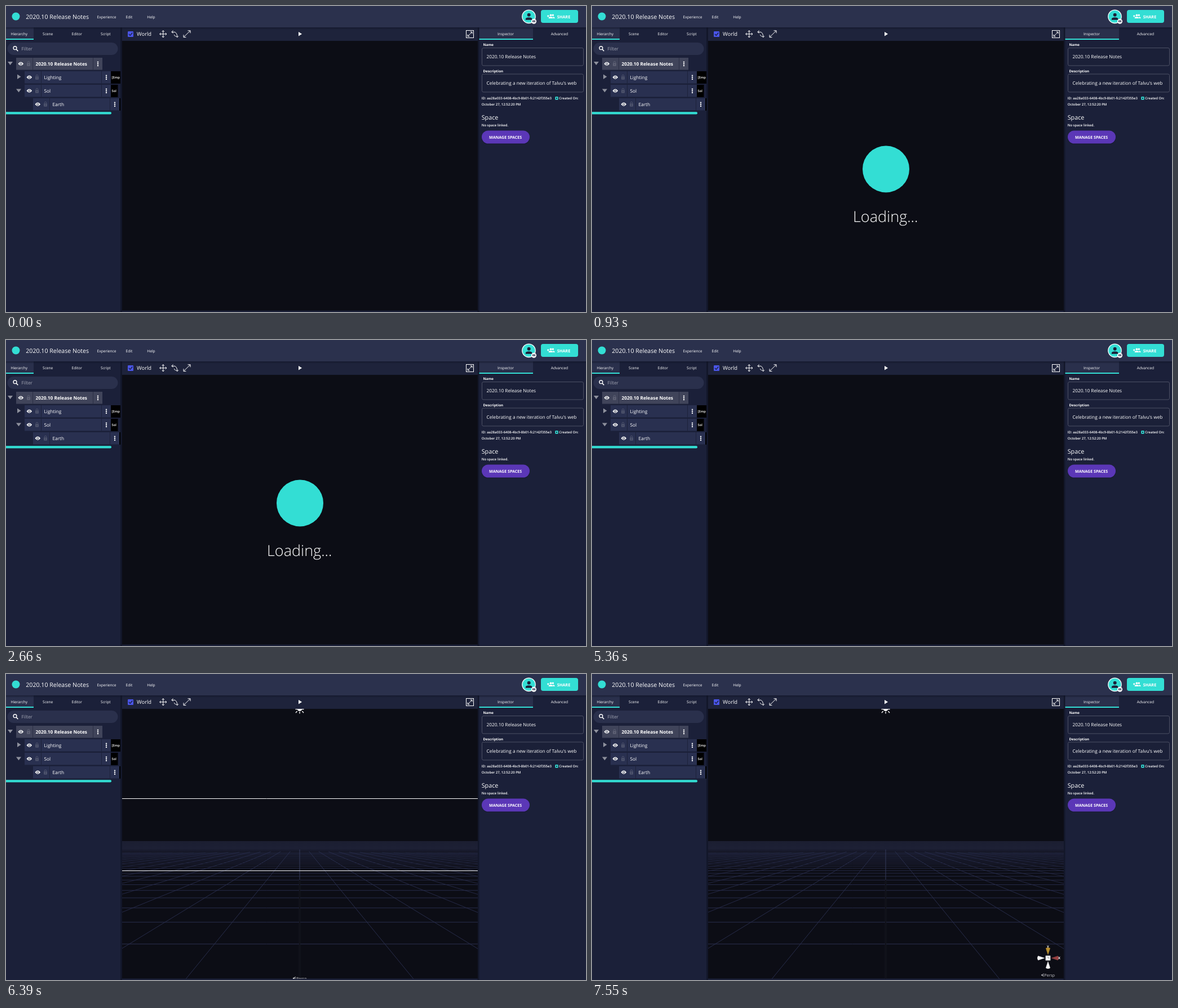
Write an HTML page that moves like this. It is 1029x544 px and loops after 8 s.

```html
<!DOCTYPE html>
<html lang="en">
<head>
<meta charset="utf-8">
<title>Scene editor</title>
<style>
html, body { margin: 0; width: 100%; height: 100%; overflow: hidden; background: #1b2039; }
svg { display: block; width: 100vw; height: 100vh; }
text { font-family: "Open Sans", "Noto Sans", sans-serif; fill: #fff; text-rendering: geometricPrecision; white-space: pre; }
.s { font-size: 6.64px; }
.m { font-size: 8.3px; }
.l { font-size: 10.6px; }
.note { font-size: 6px; font-weight: 600; }
.b { font-weight: 700; }
.line { fill: none; stroke: #fff; }

/* Hard cuts on an 8 s loop */
.cut { opacity: 0; animation: 8s step-end infinite; }
#loader { animation-name: loader; }
#scene { animation-name: scene; }
.flash { animation-name: flash; }
.gizmo { animation-name: gizmo; }
#mid { animation-name: mid; }
#low { animation-name: low; }
@keyframes loader { 0% { opacity: 0 } 11.625% { opacity: 1 } 47.625%, 100% { opacity: 0 } }
@keyframes scene { 0% { opacity: 0 } 79.875%, 100% { opacity: 1 } }
@keyframes flash { 0% { opacity: 0 } 79.875% { opacity: 1 } 82.75%, 100% { opacity: 0 } }
@keyframes gizmo { 0% { opacity: 0 } 82.75%, 100% { opacity: 1 } }
@keyframes mid { 0% { opacity: 0 } 79.875% { opacity: 1 } 94.375%, 100% { opacity: 0 } }
@keyframes low { 0% { opacity: 0 } 82.75% { opacity: 1 } 94.375%, 100% { opacity: 0 } }
</style>
</head>
<body>
<svg viewBox="0 0 1029 544" preserveAspectRatio="none">
  <defs>
    <linearGradient id="haze" x1="0" y1="0" x2="0" y2="1">
      <stop offset="0" stop-color="#1b1e31"/>
      <stop offset=".5" stop-color="#1d2035"/>
      <stop offset="1" stop-color="#1d2035" stop-opacity="0"/>
    </linearGradient>
    <linearGradient id="shade" x1="0" y1="0" x2="0" y2="1">
      <stop offset="0" stop-color="#101426" stop-opacity=".6"/>
      <stop offset="1" stop-color="#101426" stop-opacity="0"/>
    </linearGradient>
    <clipPath id="view"><rect x="206" y="62" width="631" height="479.5"/></clipPath>
    <clipPath id="side"><rect y="60" width="203" height="200"/></clipPath>
    <g id="eye">
      <path d="M-4.8 0Q0-6.4 4.8 0Q0 6.4-4.8 0Z" fill="#fff"/>
      <circle r="2.1" fill="#252b45"/><circle r="1.2" fill="#fff"/>
    </g>
    <g id="lock" opacity=".32">
      <rect x="-3" y="-1.5" width="6" height="5.5" rx=".7" fill="#9a9ca8"/>
      <path d="M-1.8-1.5V-2.6A1.8 1.8 0 0 1 1.8-2.6V-1.5" fill="none" stroke="#9a9ca8"/>
      <circle cy="1.2" r=".8" fill="#252b45"/>
    </g>
    <g id="dots" fill="#fff"><circle cy="-3.2" r="1.2"/><circle r="1.2"/><circle cy="3.2" r="1.2"/></g>
    <path id="cone" d="M0 5.5L-4 17.5Q0 20.5 4 17.5Z"/>
  </defs>

  <!-- viewport -->
  <rect x="203" y="38" width="3" height="506" fill="#13172a"/>
  <rect x="836.5" y="38" width="3" height="506" fill="#13172a"/>
  <rect x="206" y="62" width="631" height="479.5" fill="#0c0d15"/>
  <g id="loader" class="cut">
    <circle cx="521.5" cy="290" r="41.5" fill="#33ded4"/>
    <text x="463" y="383.5" font-size="27" font-weight="300">Loading...</text>
  </g>
  <g clip-path="url(#view)">
    <g id="scene" class="cut">
      <rect x="206" y="297" width="631" height="27" fill="url(#haze)"/>
      <g id="grid" fill="none" stroke="#2b3050"></g>
      <path d="M521 312V366" stroke="#343a5b"/>
      <path d="M521 366V542" stroke="#25283a" stroke-width="2.4"/>
      <path d="M521 366V542" stroke="#050609" stroke-width="1.3"/>
      <path d="M517 62A4 4 0 0 0 525 62Z" fill="#fff"/>
      <path class="line" d="M513.5 62.5H528.5M516.5 66L514 69.2M521 67V70.5M525.5 66L528 69.2" stroke-width="1.3"/>
    </g>
    <path class="cut flash line" d="M206 221.5H837"/>
    <path id="mid" class="cut line" d="M206 349.8H837" stroke-width="1.1" opacity=".9"/>
    <path id="low" class="cut line" d="M782 500H837"/>
    <g class="cut flash" opacity=".8">
      <path class="line" d="M514 538.5L509 541L514 543.5M509 541H514" stroke-width=".8"/>
      <text x="515" y="543.5" font-size="7" fill-opacity=".8">Persp</text>
    </g>
    <g class="cut gizmo">
      <g transform="translate(809 505)">
        <use href="#cone" fill="#b58b2c" transform="rotate(180)"/>
        <use href="#cone" fill="#943f40" transform="rotate(-90)"/>
        <use href="#cone" fill="#f4f4f4" transform="rotate(90)"/>
        <use href="#cone" fill="#f4f4f4"/>
        <rect x="-4.3" y="-4.3" width="8.6" height="8.6" fill="#fff"/>
        <path d="M0-3V0H3" fill="none" stroke="#777" stroke-width=".8"/>
      </g>
      <text class="b" x="807" y="487" font-size="6">Y</text>
      <text class="b" x="827" y="507" font-size="6">X</text>
      <path d="M802 532.7L797 535.3L802 537.9M797 535.3H802" fill="none" stroke="#c5c5ca" stroke-width=".8"/>
      <text x="802.5" y="537.9" font-size="7" style="fill:#c9c9cf">Persp</text>
    </g>
  </g>

  <!-- viewport toolbar -->
  <rect x="206" y="38" width="631" height="23.5" fill="#1e233b"/>
  <rect x="216" y="45" width="10" height="10" rx="1.2" fill="#4a55e8"/>
  <path d="M218 50L220.3 52.3L224.3 47.5" fill="none" stroke="#1a1f38" stroke-width="1.3"/>
  <text x="232" y="53" font-size="9.4">World</text>
  <path class="line" d="M272.8 49.8H284.8M278.8 43.8V55.8M276.8 45.8L278.8 43.6L280.8 45.8M276.8 53.8L278.8 56L280.8 53.8M274.8 47.8L272.6 49.8L274.8 51.8M282.8 47.8L285 49.8L282.8 51.8"/>
  <path class="line" d="M296.5 43.5L293.8 46.3L297 48.3M294 46.2H298Q303.5 46.5 303.8 55M301.5 53.5L303.8 55.8L305.8 53.3M298 51L301 54.5"/>
  <path class="line" d="M315 55.5L327 43.8M322.5 43.8H327V48.2M315 51.2V55.6H319.4"/>
  <path d="M519 46L525 49.7L519 53.4Z" fill="#fff"/>
  <rect class="line" x="816.5" y="43.5" width="13" height="13"/>
  <path class="line" d="M819 54L827 46M823.5 46H827V49.5M819 50.5V54H822.5"/>

  <!-- left panel -->
  <rect y="38" width="49" height="21" fill="#2a304c"/>
  <rect y="58" width="49" height="2" fill="#33ded4"/>
  <text class="s" x="8.5" y="52">Hierarchy</text>
  <text class="s" x="65" y="52">Scene</text>
  <text class="s" x="116.5" y="52">Editor</text>
  <text class="s" x="168" y="52">Script</text>
  <rect x="2.5" y="65" width="196" height="22" rx="11" fill="#2a304c"/>
  <circle class="line" cx="16" cy="74.7" r="2.9" stroke-width="1.4"/>
  <path class="line" d="M18.2 77L21.3 80.1" stroke-width="1.6"/>
  <text class="m" x="27.5" y="79" style="fill:#a3a6b4">Filter</text>
  <path d="M3 99H12L7.5 105ZM18 147.5H27L22.5 153.5ZM20 121.5V130L26.5 125.7Z" fill="#8d909c"/>
  <g id="tree" clip-path="url(#side)"></g>
  <path d="M0 188.3H185Q187 188.3 187 190.4Q187 192.5 185 192.5H0Z" fill="#33ded4"/>

  <!-- inspector -->
  <rect x="839.5" y="38" width="95.5" height="21" fill="#2a304c"/>
  <rect x="839.5" y="58" width="95.5" height="2" fill="#33ded4"/>
  <text class="s" x="872" y="52">Inspector</text>
  <text class="s" x="966.8" y="52">Advanced</text>
  <text class="b" x="846.5" y="71.3" font-size="6.2">Name</text>
  <text class="b" x="846.5" y="117.8" font-size="6.2">Description</text>
  <g fill="#1b2038" stroke="#4c5064">
    <rect x="844.5" y="74.5" width="180" height="31.5" rx="2.5"/>
    <rect x="844.5" y="121" width="180" height="32" rx="2.5"/>
  </g>
  <text class="m" x="852.5" y="93.3">2020.10 Release Notes</text>
  <text class="m" x="852.5" y="140">Celebrating a new iteration of Talvu's web</text>
  <text class="note" x="843.7" y="166.2">ID: aa28a033-6408-4bc9-8b01-fc2142f355e3</text>
  <rect x="974.3" y="161.3" width="5.4" height="5.4" rx=".8" fill="#33ded4"/>
  <rect x="976" y="163" width="2" height="2" fill="#1b2039"/>
  <text class="note" x="981.2" y="166.2">Created On:</text>
  <text class="note" x="843.7" y="177">October 27, 12:52:20 PM</text>
  <text x="843.7" y="202" font-size="10.8">Space</text>
  <text class="note" x="843.7" y="213.8">No space linked.</text>
  <rect x="844" y="223" width="85" height="23" rx="11.5" fill="#12162a" opacity=".5"/>
  <rect x="844" y="221.5" width="85" height="23" rx="11.5" fill="#5b37b7"/>
  <text class="b" x="857" y="235.8" font-size="7.1">MANAGE SPACES</text>

  <!-- header -->
  <rect y="38" width="1029" height="4" fill="url(#shade)"/>
  <rect width="1029" height="38" fill="#2b314d"/>
  <circle cx="17.5" cy="18.5" r="7" fill="#33ded4"/>
  <text class="l" x="35.3" y="22.8">2020.10 Release Notes</text>
  <text class="s" x="161.5" y="21.8">Experience</text>
  <text class="s" x="212.5" y="21.8">Edit</text>
  <text class="s" x="250.3" y="21.8">Help</text>
  <circle cx="927.5" cy="18.8" r="11.7" fill="#33ded4" stroke="#fff" stroke-width="1.3"/>
  <circle cx="927.7" cy="15.8" r="3" fill="#1b2039"/>
  <path d="M921.8 24.8V23Q922.3 20.2 927.7 20.2Q933 20.2 933.5 23V24.8Z" fill="#1b2039"/>
  <circle cx="936.5" cy="27.2" r="4.5" fill="#fff"/>
  <path d="M934 25.6H939V28.6H934Z" fill="#2b314d"/>
  <path d="M935 27.1H938" stroke="#fff" stroke-width=".8"/>
  <rect x="949" y="7" width="66" height="23" rx="4" fill="#33ded4"/>
  <g fill="#fff">
    <circle cx="966.5" cy="16.3" r="1.9"/><circle cx="970.3" cy="16.3" r="1.7"/>
    <path d="M962.8 22V20.8Q963.3 19 966.5 19Q969.7 19 970.2 20.8V22ZM970.8 22V20.5L970 19Q973 19.2 973.4 20.8V22Z"/>
    <path d="M960 17.3H963.6V18.5H960ZM961.2 16.1H962.4V19.7H961.2Z"/>
  </g>
  <text class="b" x="977.7" y="21.6" font-size="7.3">SHARE</text>
</svg>
<script>
const byId = id => document.getElementById(id);

// Tree rows: left edge, top, label, tag text, tag width
const rows = [
  [18, 92, "2020.10 Release Notes", "", 0],
  [33, 116, "Lighting", "[Emp", 17],
  [33, 140, "Sol", "Sol", 12.5],
  [48, 164, "Earth", "", 2]
];
byId("tree").innerHTML = rows.map(([x, y, label, tag, w], i) => {
  const mid = y + 10.8;
  const divider = dx => `<rect x="${x + dx}" y="${y}" width="1" height="21.5" fill="${i ? "#1d223a" : "#2b2f45"}"/>`;
  return `<rect x="${x}" y="${y}" width="153" height="21.5" fill="${i ? "#293050" : "#40445a"}"/>
    ${divider(29)}${divider(136)}
    <use href="#eye" x="${x + 8.3}" y="${mid}"/>
    <use href="#lock" x="${x + 22}" y="${mid}"/>
    <use href="#dots" x="${x + 145}" y="${mid}"/>
    <text class="m${i ? "" : " b"}" x="${x + 34.5}" y="${mid + 3}">${label}</text>
    <rect x="${x + 153}" y="${y}" width="${w}" height="22" fill="#000"/>
    <text x="${x + 154.5}" y="${mid + 2.4}" font-size="5.8" font-weight="600">${tag}</text>`;
}).join("");

// Ground plane in perspective
const cx = 521, horizon = 295, slope = 0.817;
let grid = "";
for (let n = 0; n < 28; n++) {
  const y = horizon + 1 / (0.005405 + 0.001435 * n);
  grid += `<path d="M206 ${y.toFixed(2)}H837" opacity="${Math.max(0.3, 1 - n * 0.025).toFixed(2)}"/>`;
}
for (let m = -24; m <= 24; m++) {
  if (!m) continue;
  const a = Math.abs(m), top = 315 + Math.min(a, 10) * 0.3;
  const at = y => (cx + m * slope * (y - horizon)).toFixed(1);
  grid += `<path d="M${at(top)} ${top}L${at(542)} 542" opacity="${Math.max(0.35, 1 - a * 0.05).toFixed(2)}"/>`;
}
byId("grid").innerHTML = grid;
</script>
</body>
</html>
```
